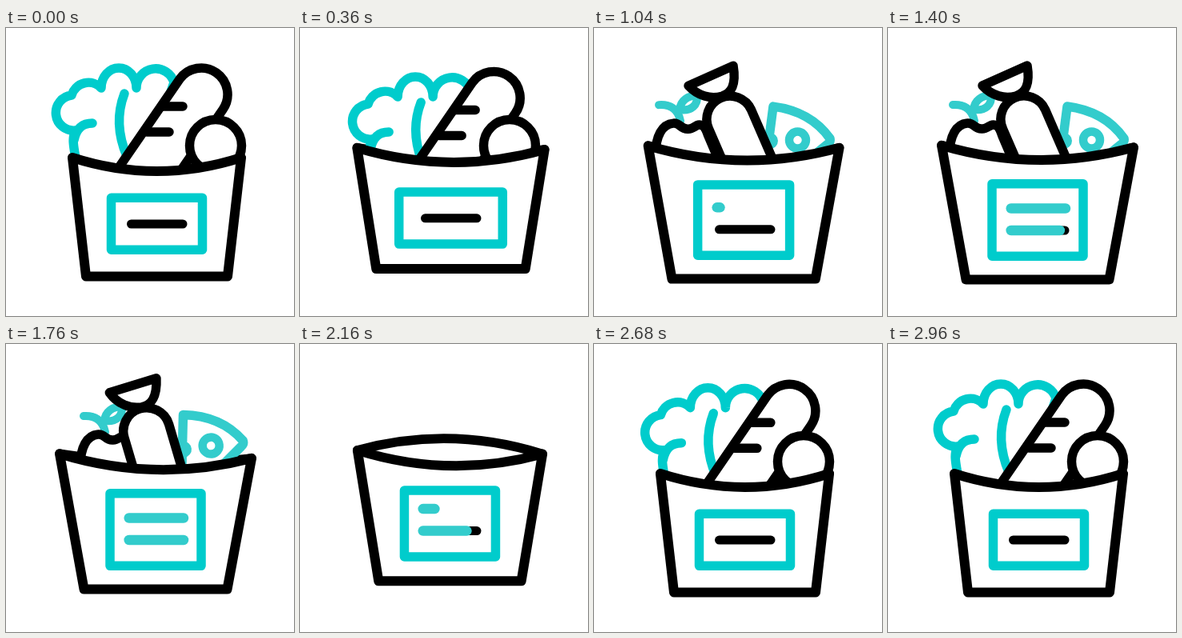
Recreate the animation shown at these times as an HTML page with a canvas. Size 360x360 px, loop 3 s.

```html
<!DOCTYPE html>
<html lang="en">
<head>
<meta charset="utf-8">
<title>Grocery bag</title>
<style>
  html, body { margin: 0; height: 100%; overflow: hidden; background: #fff; }
  canvas { display: block; width: 360px; height: 360px; }
</style>
</head>
<body>
<canvas id="stage" width="360" height="360"></canvas>
<script>
const ctx = document.getElementById('stage').getContext('2d');
const LOOP = 3000, STEP = 40, TRAVEL = 360, SWAP = 720, SWAP_BACK = 2200;
const STROKE = 11.5, SAG = 17;
const BLACK = '#000', TEAL = '#00cccc', SOFT_TEAL = '#33cccc';

const progress = (t, from, to) => Math.min(1, Math.max(0, (t - from) / (to - from)));
const smooth = (t, from, to) => {
  const u = progress(t, from, to);
  return u * u * (3 - 2 * u);
};
const easeOut = (t, from, to) => 1 - (1 - progress(t, from, to)) ** 2;

// hide: offset inside the bag; leave, enter: start times; lean: dx, dy, degrees of the sway
const baking = [
  { draw: lettuce, hide: [36, 125], leave: 200, enter: 2440 },
  { draw: baguette, hide: [-50, 120], leave: 240, enter: 2372 },
  { draw: tomato, hide: [-14, 60], leave: 360, enter: 2340 }
];
const snacks = [
  { draw: cheese, hide: [-15, 85], lean: [0, -5, -6] },
  { draw: apple, hide: [28, 95], lean: [16, -6, 0] },
  { draw: sausage, hide: [12, 130], lean: [5, -4, 7] }
].map(item => ({ ...item, leave: 1760, enter: SWAP }));

function shape(d, color = BLACK, fill = null, width = STROKE) {
  const path = new Path2D(d);
  if (fill) {
    ctx.fillStyle = fill;
    ctx.fill(path);
  }
  ctx.strokeStyle = color;
  ctx.lineWidth = width;
  ctx.stroke(path);
}

function disc(x, y, r, color, fill, width = STROKE) {
  shape(`M${x - r} ${y}a${r} ${r} 0 1 1 ${2 * r} 0a${r} ${r} 0 1 1 ${-2 * r} 0Z`, color, fill, width);
}

function lettuce() {
  shape('M88 170C86 152 81 140 87 128A22 22 0 0 1 82 84A22 22 0 0 1 119 75'
    + 'A22 25 0 0 1 163 75A24 24 0 0 1 210 68L165 200', TEAL, '#fff');
  shape('M85 140C88 126 95 119 108 119M148 82C138 108 140 134 151 160', TEAL);
}

function baguette() {
  shape('M120 205L217 64A33 33 0 0 1 271 102L200 205', BLACK, '#fff');
  shape('M196 98H221M176 130H204');
}

function tomato() {
  disc(262, 147, 32.5, BLACK, '#fff');
}

function cheese() {
  shape('M214 175L224 98Q271 104 295 138Q296 142 292 145L255 175', SOFT_TEAL, '#fff');
  disc(254.5, 140, 10.5, SOFT_TEAL, '#fff', 10.5);
  disc(220, 141, 5, SOFT_TEAL, SOFT_TEAL, 10);
}

function apple() {
  shape('M81 96C95 95 105 101 108 116', SOFT_TEAL, null, 10);
  shape('M107 102C108 90 118 84 129 84C130 96 122 104 107 102Z', SOFT_TEAL, '#fff', 10);
  shape('M77 162C76 134 86 120 99 119C108 118 108 127 118 126C126 126 128 118 136 122C140 125 141 130 143 135L160 175',
    BLACK, '#fff');
}

function sausage() {
  shape('M118 72L174 47C178 71 172 81 160 85C146 89 130 85 118 72Z', BLACK, '#fff');
  shape('M175.6 200L143.6 126.2A29 29 0 0 1 196.4 101.8L239 200', BLACK, '#fff');
}

function drawItem({ draw, hide, leave, enter, lean = [0, 0, 0] }, t, sway) {
  const entering = enter < leave ? t < leave : t > SWAP_BACK;
  const depth = entering
    ? (1 - progress(t, enter, enter + TRAVEL)) ** 3
    : progress(t, leave, leave + TRAVEL) ** 3;
  ctx.save();
  ctx.translate(180 + hide[0] * depth + lean[0] * sway, 120 + hide[1] * depth + lean[1] * sway);
  ctx.rotate(lean[2] * sway * Math.PI / 180);
  ctx.translate(-180, -120);
  draw();
  ctx.restore();
}

function drawLabel(x, y, half, height, t) {
  shape(`M${x - half} ${y + 32.3}h${2 * half}v${-height}h${-2 * half}Z`, TEAL);
  shape(`M156.5 ${y}h64.5`, BLACK, null, 11);
  const tealLine = (lineY, part) => {
    if (part > 0) shape(`M153.7 ${lineY}h${68.3 * part}`, SOFT_TEAL, null, 12.5);
  };
  tealLine(y - 27.5, smooth(t, 980, 1400) - smooth(t, 1880, 2280));
  tealLine(y, smooth(t, 1080, 1480) - smooth(t, 2040, 2460));
}

function render(t) {
  // stretch: first hop, hop: second hop, form: narrow label bag (0) to tall bag (1)
  const stretch = easeOut(t, 200, 680) - smooth(t, 720, 1080);
  const hop = easeOut(t, 1630, 2110) - smooth(t, 2200, 2575);
  const form = smooth(t, 680, 1120) - smooth(t, 1840, 2720);
  const sway = smooth(t, 1600, 1760) - smooth(t, 2120, 2400);
  const open = smooth(t, 240, 640) - smooth(t, 740, 1000)
    + smooth(t, 1640, 2000) - smooth(t, 2440, 2720);

  const x = 188.5 - 1.5 * form;
  const bottom = 310.5 + 4 * form - 17 * (stretch + hop);
  const rimY = bottom - 148.5 - 18 * form - 3 * stretch;
  const top = 105.5 + 14.5 * form + 21 * stretch;
  const base = 88.5 + form + 8.5 * stretch;
  const tilt = 2 * stretch + 1.3 * form + 1.5 * sway;
  const left = x - top, right = x + top, leftY = rimY - tilt, rightY = rimY + tilt;
  const rim = sag => `${left} ${leftY}Q${x} ${rimY + 2 * sag} ${right} ${rightY}`;

  ctx.fillStyle = '#fff';
  ctx.fillRect(0, 0, 360, 360);
  ctx.lineCap = ctx.lineJoin = 'round';

  shape(`M${rim(SAG * (1 - 2 * open))}`);
  ctx.save();
  ctx.clip(new Path2D(`M0 0V${leftY}L${rim(SAG)}H360V0Z`));
  const group = t < SWAP || t > SWAP_BACK ? baking : snacks;
  group.forEach(item => drawItem(item, t, sway));
  ctx.restore();

  shape(`M${rim(SAG)}L${x + base} ${bottom}H${x - base}Z`, BLACK, '#fff', 12);
  drawLabel(x, bottom - 65.5 + 4 * (form + stretch), 57 + 14 * stretch, 65 + 25.5 * form, t);
}

function frame() {
  const t = performance.now() % LOOP;
  render(Math.floor(t / STEP) * STEP);
  requestAnimationFrame(frame);
}
frame();
</script>
</body>
</html>
```
